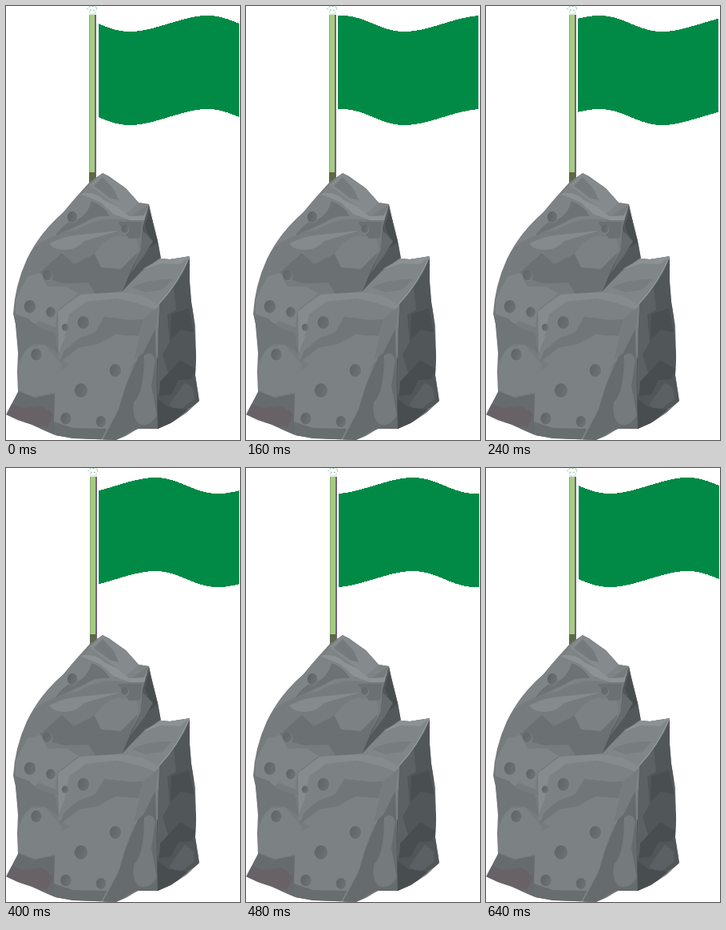
Write an HTML page that moves like this. It is 293 px wide and 543 px high and loops after 0.72 s.

```html
<!DOCTYPE html>
<html lang="en">
<head>
<meta charset="utf-8">
<title>Flag on a rock</title>
<style>
html, body { margin: 0; width: 100%; height: 100%; overflow: hidden; background: #fff; }
svg { display: block; width: 100%; height: 100%; }
#pole rect, #flag { shape-rendering: crispEdges; }
</style>
</head>
<body>
<svg viewBox="0 0 293 543" preserveAspectRatio="none">
  <defs>
    <linearGradient id="pit" x1="0" y1="0" x2="1" y2="0.5">
      <stop offset="0" stop-color="#5d6264"/>
      <stop offset="1" stop-color="#6c7173"/>
    </linearGradient>
    <clipPath id="edge">
      <path d="M121 209 L129 213 L150 228 L166 246 L179 248 L182 262 L190 294 L194 316 L205 317 L218 315 L230 313 L230 345 L232 370 L237 400 L238 440 L237 462 L242 494 L226 509 L206 522 L190 529 L165 529 L150 538 L138 543 L110 542 L84 541 L62 537 L48 531 L33 524 L15 518 L0 511 L8 496 L15 483 L14 458 L15 434 L12 398 L9 385 Q11 350 26 317 Q42 284 72 258 L87 240 L105 220 Z"/>
    </clipPath>
  </defs>

  <g id="pole">
    <rect x="105" y="11" width="9" height="211" fill="#73627d"/>
    <rect x="105" y="11" width="7" height="211" fill="#a5cc83"/>
    <rect x="105" y="11" width="1" height="211" fill="#8cae70"/>
    <rect x="105" y="208" width="8" height="14" fill="#5c6947"/>
    <ellipse cx="109" cy="3" rx="6" ry="2.5" fill="none" stroke="#74b892" stroke-dasharray="2 2"/>
    <path d="M106 6 V10 H113 V6" fill="none" stroke="#c3dccb"/>
  </g>
  <path id="flag" fill="#008a45"/>

  <g clip-path="url(#edge)">
    <rect y="205" width="293" height="338" fill="#767b7d"/>

    <!-- upper face -->
    <path fill="#7e8385" d="M121 209 L88 240 Q50 272 34 303 Q58 284 88 280 Q118 262 150 268 L179 248 L150 228 Z"/>
    <path fill="#858a8c" d="M121 209 L104 224 L128 242 L150 260 L167 246 L150 228 Z"/>
    <path fill="#757a7c" d="M121 214 L110 225 L130 240 L141 243 L135 229 Z"/>
    <path fill="#8d9294" d="M93 235 Q111 231 123 243 L139 251 L154 263 L173 262 L179 248 L176 268 L155 268 L134 260 L119 246 Z"/>
    <path fill="#6d7274" d="M107 244 Q122 249 130 263 Q112 261 98 271 Q80 280 62 287 Q75 268 92 266 Q104 258 107 244 Z"/>
    <path fill="#858a8c" d="M54 297 Q76 286 103 285 L143 281 Q118 288 98 294 Q88 305 75 305 Q60 306 54 297 Z"/>
    <path fill="#6b7072" d="M70 309 L85 323 L111 310 L119 327 L144 329 L166 306 L145 357 L112 360 L103 346 L74 347 Q50 342 43 333 Z"/>
    <path fill="#7c8183" d="M111 310 Q121 292 141 287 L164 292 L166 307 L144 329 L119 327 Z"/>
    <path fill="#6b7072" d="M140 270 L170 270 L168 290 L154 291 Z"/>

    <!-- right side of the peak -->
    <path fill="#535859" d="M179 248 L196 316 L174 327 L145 358 L157 329 L169 305 L171 277 Z"/>
    <path fill="#484d4f" d="M179 256 L190 296 L176 305 L181 292 L174 276 Z"/>
    <path fill="#656a6c" d="M171 281 L184 294 L174 311 L155 336 L169 305 Z"/>

    <!-- shoulder and block -->
    <path fill="#808587" d="M145 358 Q165 334 194 315 L230 313 Q216 347 191 373 L170 362 Z"/>
    <path fill="#8c9193" d="M172 330 L194 315 L230 313 L218 323 L195 322 Z"/>
    <path fill="#777c7e" d="M158 352 Q178 341 208 342 L196 355 L174 358 Z"/>
    <path fill="#515658" d="M230 313 L242 495 L186 532 L188 469 L191 373 Q216 347 230 313 Z"/>
    <path fill="#5c6163" d="M191 373 L210 352 L213 380 L202 386 L205 420 L196 436 L203 459 L189 488 Z"/>
    <path fill="#494e50" d="M207 386 L229 378 L235 408 L219 405 L206 418 Z"/>
    <path fill="#484d4f" d="M193 470 L218 443 L238 454 L232 467 L216 468 L207 486 L192 488 Z"/>
    <path fill="#5b6062" d="M211 489 L224 471 L234 478 L236 492 L216 507 L204 499 Z"/>
    <path fill="#484d4f" d="M190 492 L204 502 L228 505 L201 528 L186 531 Z"/>
    <path d="M230 313 Q216 347 191 373 L190 402" fill="none" stroke="#91979a" stroke-width="1.5"/>

    <!-- left side -->
    <path fill="#7f8486" d="M12 367 L27 338 L43 334 L52 351 L76 351 L91 360 L64 381 L62 402 L42 394 L20 406 L12 395 Z"/>
    <path fill="#707577" d="M10 385 L28 391 L40 402 L61 409 L66 435 Q46 418 31 424 L18 452 Z"/>
    <path fill="#7c8183" d="M16 452 Q20 432 31 426 L49 424 L70 449 L66 482 L36 489 L15 480 Z"/>
    <path fill="#666b6d" d="M15 482 L36 490 L65 484 L61 540 L31 526 L44 507 L22 504 L2 510 Z"/>
    <path fill="#686267" d="M7 498 L23 503 L45 500 L59 511 L52 527 L30 525 L0 513 Z"/>

    <!-- front face -->
    <path fill="#7c8183" d="M65 382 L93 361 L145 358 L170 362 L191 373 L190 440 L159 446 L141 505 L130 543 L62 538 L60 518 L62 460 L80 448 L65 440 L72 422 Z"/>
    <path fill="#868b8d" d="M65 382 L93 361 L145 358 L170 362 L191 373 L190 381 Q166 371 139 366 L100 370 L79 386 L73 416 L66 435 Z"/>
    <path fill="#717678" d="M73 431 L91 416 L112 408 L123 389 L159 393 L172 392 L166 413 L137 411 L115 423 L92 427 L67 446 Z"/>
    <path fill="#666b6d" d="M187 402 L190 531 L160 530 L138 543 L121 543 L141 505 L150 475 L166 438 Z"/>
    <path fill="#767b7d" d="M191 376 L187 404 L172 434 L160 443 L172 392 Z"/>
    <path fill="#757a7c" d="M173 437 Q184 430 187 443 L182 475 L189 512 Q181 526 170 524 Q157 520 160 496 Q173 484 173 437 Z"/>
    <path fill="#686d6f" d="M60 520 L84 528 L126 529 L119 543 L62 540 Z"/>
    <g id="pits"></g>
  </g>
</svg>
<script>
const NS = "http://www.w3.org/2000/svg";
const STEP = 80, STEPS = 9, CYCLE = 8;
const WIDTH = 176, HEIGHT = 117, SWING = 10, LEAN = 0.16;
const flag = document.getElementById("flag");
const pole = document.getElementById("pole");
const pitGroup = document.getElementById("pits");

// x, y, radius
const pits = [
  [83, 264, 7], [149, 279, 5], [52, 337, 6.5], [30, 376, 8],
  [56, 383, 6.5], [74, 402, 4.5], [97, 396, 8], [38, 436, 7.5],
  [137, 456, 8], [94, 481, 9], [75, 516, 7.5], [119, 520, 7]
];

function addEllipse(cx, cy, rx, ry, fill) {
  const e = document.createElementNS(NS, "ellipse");
  const attrs = { cx, cy, rx, ry, fill };
  for (const key in attrs) e.setAttribute(key, attrs[key]);
  pitGroup.append(e);
}

for (const [x, y, r] of pits) {
  addEllipse(x + 0.5, y + 0.5, r * 0.95, r * 1.05, "#808587");
  addEllipse(x, y, r * 0.9, r, "url(#pit)");
}

// A sine wave whose falling side is a little steeper.
function wave(angle) {
  return 22 - SWING * Math.cos(angle - LEAN * Math.cos(angle));
}

function drawFlag(step) {
  const phase = (step - 2) / CYCLE * 2 * Math.PI;
  const sway = -Math.cos(phase);
  const left = 115.7 + sway * 0.6;
  const top = [], bottom = [];
  for (let x = 0; x <= WIDTH; x += 2) {
    const y = wave(x / WIDTH * 2 * Math.PI - phase);
    const px = (left + x).toFixed(2);
    top.push(px + " " + y.toFixed(2));
    bottom.unshift(px + " " + (y + HEIGHT).toFixed(2));
  }
  flag.setAttribute("d", "M" + top.concat(bottom).join("L") + "Z");
  pole.setAttribute("transform", `translate(${Math.round(sway * 0.5 - 0.6)} 0)`);
}

let last = -1;
function tick(now) {
  const step = Math.floor(now / STEP) % STEPS;
  if (step !== last) drawFlag(last = step);
  requestAnimationFrame(tick);
}
drawFlag(0);
requestAnimationFrame(tick);
</script>
</body>
</html>
```
